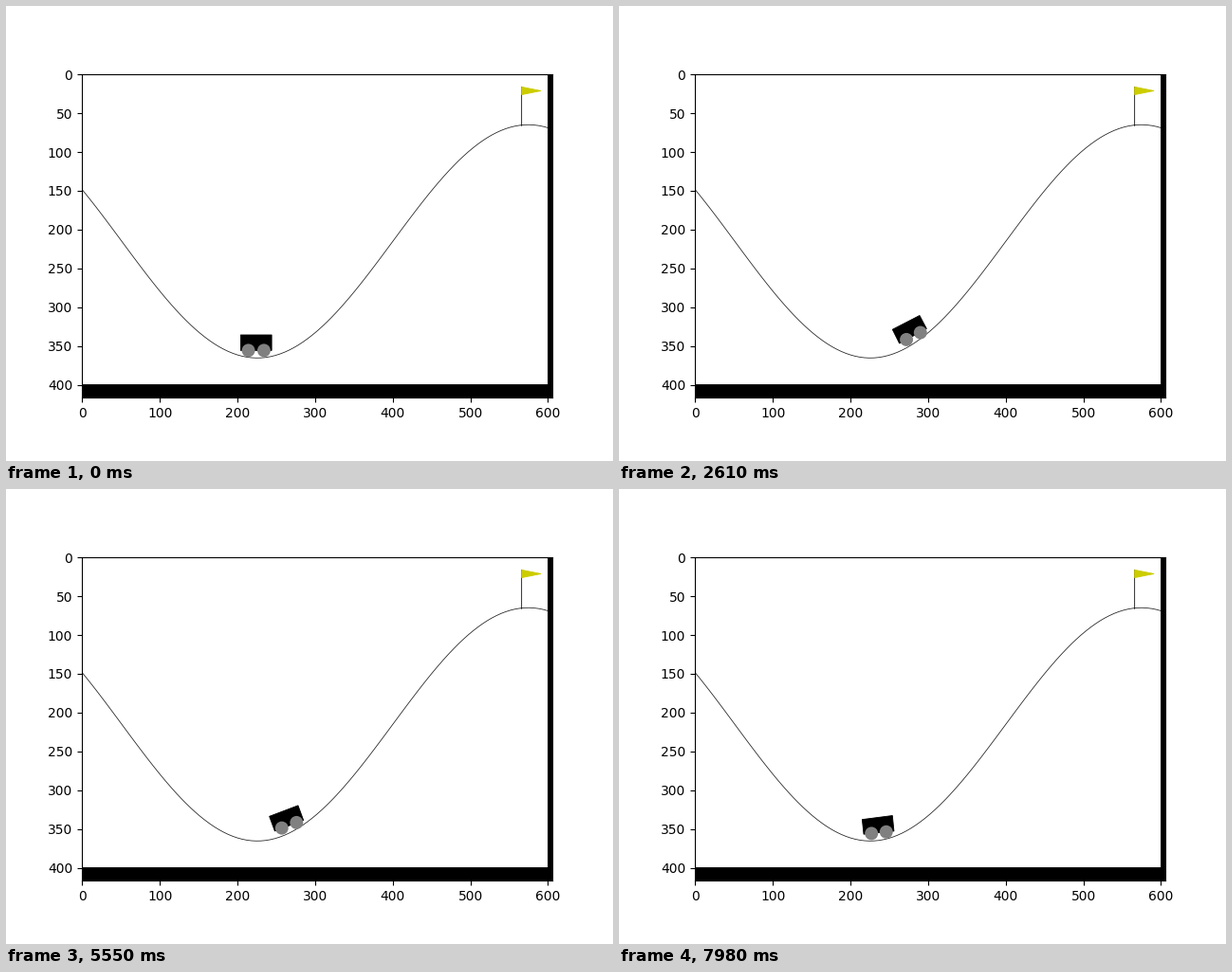
A matplotlib script that plays this animation: 640 by 480 pixels, repeating every 8 s.

```python
import numpy as np
import matplotlib.pyplot as plt
from matplotlib.animation import FuncAnimation
from matplotlib.patches import Circle, Polygon, Rectangle
from matplotlib.transforms import Affine2D

LOOP_MS = 8000
FRAMES = 267
VIEW_W, VIEW_H = 600, 400
PAD_W, PAD_H = 606, 417
MIN_X, MAX_X, GOAL_X = -1.2, 0.6, 0.5
VALLEY = -np.pi / 6
SCALE = VIEW_W / (MAX_X - MIN_X)
CAR_W, CAR_H, CLEARANCE = 40, 20, 10
PIXEL = 0.59  # one scene pixel, in points

PUSH, GRAVITY = 0.001, 0.0025
FLAG_SPEED = 0.0241
BRAKE, COAST, EASE = -1, 0, 0.38

# Turning points: step, distance from the valley floor, and how the engine
# finishes the leg that follows. A run ends at its last point.
RUNS = [
    [(-0.5, -0.003, BRAKE), (29, 0.2405, COAST), (65.8, -0.5024, EASE),
     (112, 1.036, None)],
    [(112.5, -0.0155, BRAKE), (126.5, 0.038, BRAKE), (144.9, -0.063, COAST),
     (175.1, 0.244, COAST), (212.3, -0.5024, EASE), (258, 1.032, None)],
    [(258.5, 0.0065, BRAKE), (288, 0.244, None)],
]


def potential(u):
    return -GRAVITY / 3 * np.cos(3 * u)


def drive(start, end, finish, dt=0.05):
    """Full push from rest, then the finishing push, from start to end."""
    side = np.sign(end - start)
    energy = potential(end) - potential(start)
    if end > GOAL_X - VALLEY:
        energy += FLAG_SPEED ** 2 / 2
    # the switch place follows from the energy balance of the leg
    switch = (side * energy / PUSH + start - finish * end) / (1 - finish)
    u, track = start, [start]
    v = side * 1e-9
    while side * (end - u) > 0 and side * v > 0:
        power = 1 if side * (switch - u) > 0 else finish
        v += (side * PUSH * power - GRAVITY * np.sin(3 * u)) * dt
        u += v * dt
        track.append(u)
    return np.array(track)


def ride(run):
    """Car position at every whole step of one run."""
    xs = []
    for (t0, u0, finish), (t1, u1, _) in zip(run, run[1:]):
        track = drive(u0, u1, finish)
        last = t1 + 1 if t1 == run[-1][0] else t1
        steps = np.arange(np.ceil(t0), np.ceil(last))
        part = (steps - t0) / (t1 - t0)
        xs.extend(VALLEY + np.interp(part, np.linspace(0, 1, len(track)), track))
    return xs


positions = [x for run in RUNS for x in ride(run)][:FRAMES]


def height(x):
    return np.sin(3 * x) * 0.45 + 0.55


def to_view(points):
    """Whole scene pixels, y pointing down."""
    p = np.floor(np.asarray(points, float))
    return np.column_stack([p[:, 0], VIEW_H - 1 - p[:, 1]])


def place(points, x):
    angle = np.cos(3 * x)
    c, s = np.cos(angle), np.sin(angle)
    turned = np.array(points) @ np.array([[c, s], [-s, c]])
    return to_view(turned + [(x - MIN_X) * SCALE,
                             CLEARANCE + height(x) * SCALE])


fig, ax = plt.subplots(figsize=(6.4, 4.8), dpi=100)
ax.set_aspect("equal")
ax.set_xlim(-0.5, PAD_W - 0.5)
ax.set_ylim(PAD_H - 0.5, -0.5)
ax.set_xticks(range(0, 601, 100))
ax.set_yticks(range(0, 401, 50))

# the scene fills whole screen rows, slightly taller than the axes
scene = Affine2D().translate(0, 0.5).scale(1, 1.002).translate(0, -1.4) + ax.transData


def add(patch, z):
    patch.set_transform(scene)
    patch.set_snap(False)
    patch.set_zorder(z)
    return ax.add_patch(patch)


def line(x, y, z, alpha=1):
    ax.plot(x, y, color="black", lw=PIXEL, alpha=alpha, zorder=z,
            snap=False, transform=scene)


add(Rectangle((VIEW_W - 0.5, -0.5), PAD_W, PAD_H + 5, color="black", lw=0), 1)
add(Rectangle((-0.5, VIEW_H - 0.5), PAD_W, PAD_H, color="black", lw=0), 1)

xs = np.linspace(MIN_X, MAX_X, 100)
line((xs - MIN_X) * SCALE, VIEW_H - 1 - height(xs) * SCALE, 1.5, alpha=0.85)

BODY = [(-CAR_W / 2, 0), (-CAR_W / 2, CAR_H), (CAR_W / 2, CAR_H), (CAR_W / 2, 0)]
AXLES = [(CAR_W / 4, 0), (-CAR_W / 4, 0)]
body = add(Polygon(BODY, fc="black", ec="black", lw=PIXEL, joinstyle="miter"), 2)
wheels = [add(Circle((0, 0), CAR_H / 2.5 + 0.5, fc="#808080", lw=0), 2.1)
          for _ in AXLES]

flag_x = (GOAL_X - MIN_X) * SCALE
foot = height(GOAL_X) * SCALE
top = foot + 50
line(*to_view([(flag_x, foot), (flag_x, top)]).T, 2.2)
flag = to_view([(flag_x, top), (flag_x, top - 10), (flag_x + 25, top - 5)])
add(Polygon(flag, fc="#cccc00", ec="#cccc00", lw=PIXEL), 2.3)


def update(step):
    x = positions[step]
    body.set_xy(place(BODY, x))
    for wheel, center in zip(wheels, place(AXLES, x)):
        wheel.center = tuple(center)
    return [body, *wheels]


anim = FuncAnimation(fig, update, frames=FRAMES, interval=LOOP_MS / FRAMES,
                     init_func=lambda: update(0), repeat=True, repeat_delay=0)
plt.show()
```
